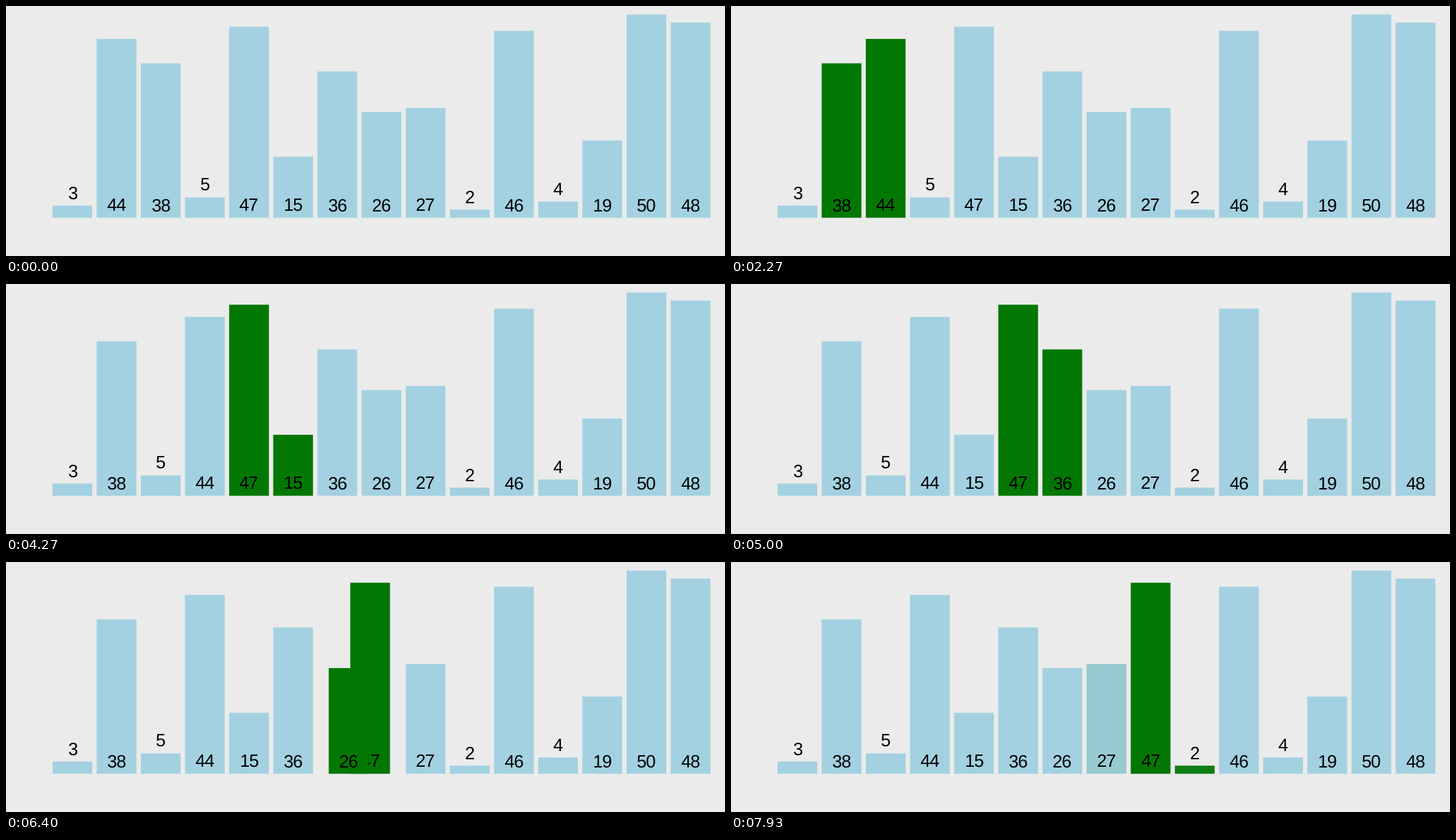
Animation of 1051x365 px, one loop 8 s. Source, as a matplotlib script:

```python
import matplotlib.pyplot as plt
import numpy as np
from matplotlib.animation import FuncAnimation
from matplotlib.patches import Rectangle

W, H, DPI = 1051, 365, 64        # a power of two keeps the pixel size exact
LOOP, TICK = 8000, 20            # ms
STEP = 1000 / 15                 # ms between visible updates
FIRST, EVERY, FADE = 750, 500, 250   # ms: first event, spacing, transition

VALUES = [3, 44, 38, 5, 47, 15, 36, 26, 27, 2, 46, 4, 19, 50, 48]
LEFT, PITCH, BAR_W = 68.0, 64.54, 58.1
BASE, UNIT = 309.2, 5.935
LABEL_GAP, FONT_PX = 9.8, 25.9

BACK = "#ebebeb"
IDLE = np.array([163, 209, 225]) / 255
ACTIVE = np.array([3, 119, 3]) / 255

plt.rcParams["font.family"] = "Liberation Sans"
plt.rcParams["text.hinting"] = "none"


def sort_states():
    """First bubble sort pass: (slot of each bar, highlight of each bar)."""
    n = len(VALUES)
    order = list(range(n))
    states = []

    def record(*lit):
        slots, glow = np.zeros(n), np.zeros(n)
        slots[order] = np.arange(n)
        glow[list(lit)] = 1
        states.append((slots, glow))

    record()
    for j in range(n - 1):
        a, b = order[j], order[j + 1]
        record(a, b)
        if VALUES[a] > VALUES[b]:
            order[j], order[j + 1] = b, a
            record(a, b)
    return states


def ease(t):
    """Cubic in-out."""
    t = min(max(t, 0), 1)
    return 4 * t**3 if t < 0.5 else 1 - 4 * (1 - t) ** 3


STATES = sort_states()

fig = plt.figure(figsize=(W / DPI, H / DPI), dpi=DPI, facecolor=BACK)
ax = fig.add_axes([0, 0, 1, 1])
ax.set(xlim=(0, W), ylim=(H, 0))
ax.axis("off")

bars, labels = [], []
for i, value in enumerate(VALUES):
    height = value * UNIT
    bar = Rectangle((0, BASE - height), BAR_W, height, lw=0, snap=False, zorder=2 * i + 1)
    bars.append(ax.add_patch(bar))
    floor = BASE if value >= 10 else BASE - height
    labels.append(ax.text(0, floor - LABEL_GAP, str(value), color="black",
                          size=FONT_PX * 72 / DPI, ha="center", va="baseline",
                          zorder=2 * i + 2))


def draw(frame):
    now = round(frame * TICK / STEP) * STEP
    k = max(0, int((now - FIRST) // EVERY) + 1)
    p = ease((now - FIRST - (k - 1) * EVERY) / FADE)
    (slot0, glow0), (slot1, glow1) = STATES[max(k - 1, 0)], STATES[k]
    xs = LEFT + PITCH * (slot0 + (slot1 - slot0) * p)
    glow = glow0 + (glow1 - glow0) * p
    for bar, label, x, g in zip(bars, labels, xs, glow):
        bar.set_x(x)
        bar.set_facecolor(IDLE + (ACTIVE - IDLE) * g)
        label.set_x(x + BAR_W / 2)
    return bars + labels


anim = FuncAnimation(fig, draw, frames=LOOP // TICK, interval=TICK,
                     init_func=lambda: draw(0), repeat=True, repeat_delay=0)
plt.show()
```
